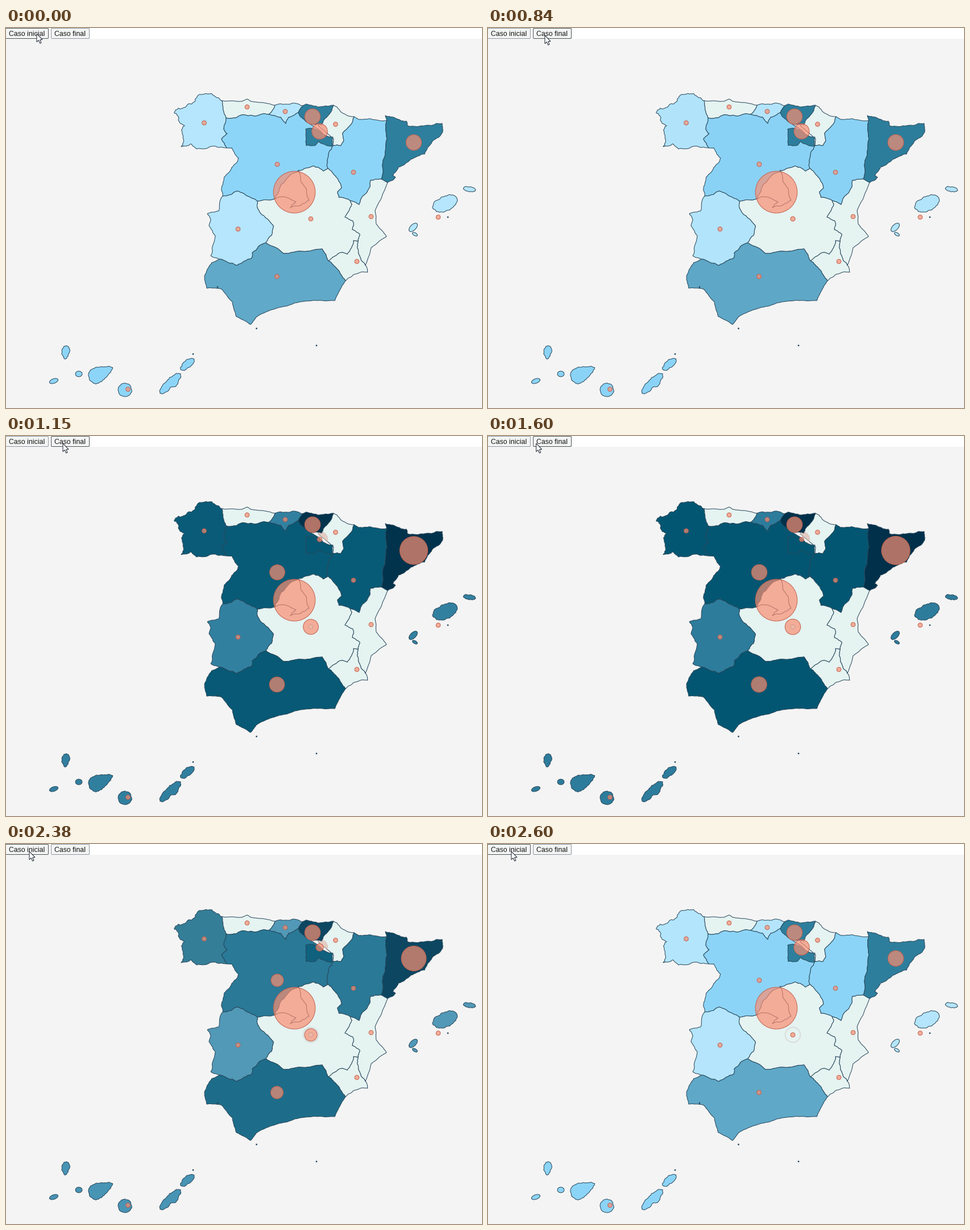
Write a matplotlib script that moves like this. It is 837 by 669 pixels and loops after 2.67 s.

```python
import numpy as np
import matplotlib.pyplot as plt
from matplotlib.animation import FuncAnimation
from matplotlib.colors import to_rgb
from matplotlib.patches import Circle, FancyBboxPatch, Polygon, Rectangle

W, H, DPI = 837, 669, 64
PX = 72 / DPI
LOOP, INTERVAL = 2670, 30
TICK = LOOP / 35

rng = np.random.default_rng(7)
plt.rcParams["toolbar"] = "None"
fig = plt.figure(figsize=(W / DPI, H / DPI), dpi=DPI, facecolor="white")
ax = fig.add_axes([0, 0, 1, 1])
ax.set_xlim(0, W)
ax.set_ylim(H, 0)
ax.axis("off")
ax.add_patch(Rectangle((0, 19), W, H, fc="#f4f4f4", ec="none", zorder=0))


def edge(*xy, wild=0.1):
    """Line through a few key points, roughened by midpoint displacement."""
    p = np.reshape(xy, (-1, 2)).astype(float)
    while np.hypot(*np.diff(p, axis=0).T).max() > 5:
        d = np.diff(p, axis=0)
        normal = np.column_stack([-d[:, 1], d[:, 0]])
        mid = p[:-1] + d / 2 + normal * rng.uniform(-wild, wild, (len(d), 1))
        p = np.insert(p, np.arange(1, len(p)), mid, axis=0)
    return p


def isle(x, y, a, b, turn=0, taper=0):
    """Rough ellipse; a negative taper narrows the end it points to."""
    th = np.linspace(0, 2 * np.pi, 13)
    u = a * np.cos(th)
    v = b * np.sin(th) * (1 + taper * np.cos(th))
    c, s = np.cos(np.radians(turn)), np.sin(np.radians(turn))
    pts = np.column_stack([x + u * c - v * s, y + u * s + v * c])
    return edge(*pts.ravel(), wild=0.2)


def join(*edges):
    return np.concatenate(edges)


# Borders are shared, so neighbours always fit together
gal_coast = edge(380, 128, 366, 119, 354, 116, 335, 123, 326, 134, 303, 141, 296, 150,
                 303, 162, 314, 172, 309, 181, 312, 195, 308, 209, wild=0.22)
gal_south = edge(308, 209, 325, 204, 335, 213, 388, 211)
gal_east = edge(380, 128, 387, 158)
gal_cyl = edge(387, 158, 383, 178, 389, 186, 379, 195, 388, 211)
ast_coast = edge(380, 128, 416, 129, 424, 125, 430, 129, 473, 136, wild=0.05)
ast_cyl = edge(387, 158, 405, 158, 414, 153, 462, 152)
ast_can = edge(473, 136, 462, 152)
can_coast = edge(473, 136, 492, 134, 506, 132, 522, 137)
can_cyl = edge(462, 152, 483, 157, 492, 168, 497, 157, 514, 149)
can_bas = edge(522, 137, 514, 149)
bas_coast = edge(522, 137, 527, 134, 548, 139, 576, 136)
bas_south = edge(576, 136, 563, 158, 555, 171, 528, 165, 514, 149)
rioja = edge(527, 178, 541, 177, 556, 186, 575, 192, 573, 208, 550, 200, 545, 206,
             528, 207, 527, 178)
nav_coast = edge(576, 136, 582, 139, 592, 150, 612, 156)
nav_ara = edge(612, 156, 592, 185, 594, 198, 589, 207, 575, 207)
ara_north = edge(612, 156, 620, 161, 670, 162)
ara_cat = edge(670, 162, 670, 195, 663, 233, 660, 266)
ara_val = edge(660, 266, 641, 268, 640, 280, 627, 296, 621, 311, 605, 304)
ara_clm = edge(566, 247, 580, 262, 590, 281, 583, 288, 585, 298, 605, 304)
ara_cyl = edge(575, 207, 565, 233, 566, 247)
cat_coast = edge(670, 162, 667, 154, 704, 164, 706, 172, 730, 172, 767, 168, 768, 183,
                 736, 222, 690, 245, 680, 260, 685, 263, 671, 272)
cat_val = edge(671, 272, 660, 266)
val_coast = edge(671, 272, 649, 322, 651, 345, 669, 367, 642, 387, 632, 418, wild=0.04)
val_clm = edge(605, 304, 608, 310, 596, 333, 610, 340, 609, 355, 622, 363, 619, 375)
val_mur = edge(619, 375, 620, 398, 632, 418)
mur_clm = edge(619, 375, 611, 374, 600, 398, 590, 395, 567, 410)
mur_and = edge(567, 410, 582, 424, 597, 445)
mur_coast = edge(632, 418, 636, 430, 615, 433, 597, 445)
cyl_clm = edge(566, 247, 558, 252, 540, 243, 514, 251)
mad_west = edge(514, 251, 483, 277, 473, 301)
mad_east = edge(473, 301, 484, 297, 510, 306, 500, 316, 533, 303, 528, 283, 514, 251)
clm_west = edge(473, 301, 442, 305)
cyl_ext = edge(442, 305, 407, 287, 381, 296)
cyl_west = edge(381, 296, 384, 262, 409, 229, 397, 211, 388, 211)
ext_west = edge(381, 296, 374, 322, 354, 327, 360, 337, 357, 348, 368, 366, 360, 401, 375, 407)
ext_and = edge(375, 407, 406, 418, 432, 405, 433, 396, 457, 378)
ext_clm = edge(442, 305, 444, 320, 470, 348, 467, 365, 457, 378)
and_clm = edge(457, 378, 488, 397, 556, 389, 567, 410, wild=0.06)
and_coast = edge(597, 445, 578, 480, 508, 484, 455, 501, 440, 509, 430, 522, 405, 508,
                 398, 482, 378, 459, 353, 458, 349, 437, 362, 413, 375, 407, wild=0.06)
# Inner sides, hidden below the two small northern regions
cyl_inner = edge(514, 149, 528, 165, 552, 180, 575, 207, wild=0)
nav_inner = edge(575, 207, 576, 195, 549, 172, 576, 136, wild=0)

PALE = ("#e5f3f1", "#e5f3f1")
LIGHT = ("#b5e6fd", "#2d7c9c")
SKY = ("#8dd5f8", "#035672")
DARK = ("#2d7f9d", "#00304a")

navarra = join(nav_coast, nav_ara, nav_inner)
regions = [
    (join(gal_coast, gal_south, gal_cyl[::-1], gal_east[::-1]), (LIGHT[0], SKY[1])),
    (join(ast_coast, ast_can, ast_cyl[::-1], gal_east[::-1]), PALE),
    (join(ast_cyl, can_cyl, cyl_inner, ara_cyl, cyl_clm, mad_west, clm_west, cyl_ext,
          cyl_west, gal_cyl[::-1]), SKY),
    (join(can_coast, can_bas, can_cyl[::-1], ast_can[::-1]), LIGHT),
    (navarra, PALE),
    (join(ara_north, ara_cat, ara_val, ara_clm[::-1], ara_cyl[::-1], nav_ara[::-1]), SKY),
    (join(cat_coast, cat_val, ara_cat[::-1]), DARK),
    (join(val_coast, val_mur[::-1], val_clm[::-1], ara_val[::-1], cat_val[::-1]), PALE),
    (join(mur_coast, mur_and[::-1], mur_clm[::-1], val_mur), PALE),
    (join(cyl_clm[::-1], ara_clm, val_clm, mur_clm, and_clm[::-1], ext_clm[::-1],
          clm_west[::-1], mad_east), PALE),
    (join(mad_west, mad_east), PALE),
    (join(ext_west, ext_and, ext_clm[::-1], cyl_ext), LIGHT),
    (join(and_clm, mur_and, and_coast, ext_and), ("#60a9c9", SKY[1])),
]
top_regions = [
    (join(bas_coast, bas_south, can_bas[::-1]), DARK),
    (rioja, (DARK[0], SKY[1])),
]
east_isles = [isle(772, 309, 23, 13, -25), isle(815, 284, 11, 4.5, 10),
              isle(716, 351, 9.5, 5, -45), isle(719, 363, 5, 2.5, 30)]
west_isles = [isle(105, 571, 12, 6.5, 95, -0.3), isle(84, 621.5, 8, 4, -20),
              isle(128, 609, 6, 5), isle(167, 608, 23, 12, -27, -0.6),
              isle(209, 637, 12, 12), isle(289, 626, 25, 8, -43),
              isle(319, 592, 15, 6.5, -38)]
regions += [(s, LIGHT) for s in east_isles]
regions += [(s, (SKY[0], LIGHT[1])) for s in west_isles]

LINE = "#27475b"
areas = []


def add_area(shape, pair, z):
    patch = ax.add_patch(Polygon(shape, ec=LINE, lw=PX, joinstyle="round", zorder=z))
    areas.append((patch, *(np.array(to_rgb(c)) for c in pair)))
    return patch


for shape, pair in regions:
    patch = add_area(shape, pair, 1)
    if shape is navarra:
        navarra_patch = patch
for shape, pair in top_regions:
    add_area(shape, pair, 3)

for x, y in [(777, 333), (329, 574), (440.5, 529), (546, 559), (372, 456)]:
    ax.add_patch(Circle((x, y), 1.4, fc=LINE, ec="none", zorder=4))

SMALL, LARGE = 3.8, 13.7
CENTRE, CORNER = (536, 336), (551.5, 182)

# Traces that the resizing bubbles leave on pale ground
smear = ax.add_patch(Circle(CORNER, 14, fc="#e4cbc1", ec="#d9c4bb", lw=PX, zorder=2))
smear.set_clip_path(navarra_patch)
halo = ax.add_patch(Circle(CENTRE, 13.2, fc="none", ec="#dadedc", lw=2 * PX, zorder=4))
dot = ax.add_patch(Circle(CENTRE, 4, fc="#edb7a5", ec="#d59a89", lw=PX, zorder=7))

bubbles = []


def add_bubble(spot, r0, r1):
    c = Circle(spot, r0, fc=to_rgb("#fa8f73") + (0.7,), ec="#c2624d", lw=PX, zorder=6)
    bubbles.append((ax.add_patch(c), r0, r1))


for spot in [(348.5, 167), (424, 139), (491, 147), (579.5, 169.5), (611, 254), (408, 354),
             (642, 332), (617, 411), (760, 333), (214.5, 636)]:
    add_bubble(spot, SMALL, SMALL)
for spot in [(477, 240), CENTRE, (476.5, 437.5)]:
    add_bubble(spot, SMALL, LARGE)
add_bubble(CORNER, LARGE, SMALL)
add_bubble((539, 156), LARGE, LARGE)
add_bubble((717, 201.5), LARGE, 25)
add_bubble((507, 289), 36.8, 36.8)


def button(x0, x1, label):
    box = FancyBboxPatch((x0 + 0.5, 0.5), x1 - x0 - 1, 18, boxstyle="round,pad=0,rounding_size=1.5",
                         fc="#f3f4f4", lw=PX, zorder=8)
    ax.add_patch(box)
    ax.text(x0 + 6, 14, label, family="Liberation Sans", size=12.3 * PX, color="#111111",
            va="baseline", zorder=10)
    return box


first = button(-1, 75, "Caso inicial")
second = button(79, 147, "Caso final")
glow = ax.add_patch(Circle((0, 0), 11, fc="#ffee22", ec="none", alpha=0.6, zorder=9))

ARROW = np.array([(0, 0), (0, 14.5), (3.3, 11.6), (5.7, 17), (8, 16), (5.7, 10.8), (10, 10.5)])
cursor = ax.add_patch(Polygon(ARROW, fc="white", ec="#1c2433", lw=PX, zorder=12))


def smooth(u):
    u = min(max(u, 0), 1)
    return u * u * (3 - 2 * u)


def cubic(u):
    u = min(max(u, 0), 1)
    return 4 * u ** 3 if u < 0.5 else 1 - 4 * (1 - u) ** 3


def pointer(k):
    if k < 20:
        s = smooth(k / 7)
        return 54 + 46 * s, 10 + 3 * s
    return 100 - 59 * smooth((k - 19) / 6), 13


def set_border(box, over, pressed):
    box.set_edgecolor("#a3abb0" if over and pressed else "#4b5358" if over else "#8d979c")


def update(i):
    # The picture advances in whole ticks
    k = int((i * INTERVAL + 20) / TICK)
    t = k * TICK
    back = cubic((t - 2160) / 500)
    f = cubic((t - 750) / 500) - back

    for patch, a, b in areas:
        patch.set_facecolor(np.clip(a + (b - a) * f, 0, 1))
    for c, r0, r1 in bubbles:
        c.set_radius(r0 + (r1 - r0) * f)
    smear.set_visible(f > 0.05)
    dot.set_visible(f > 0.1)
    halo.set_visible(back > 0.02)

    x, y = pointer(k)
    cursor.set_xy(ARROW + (x, y))
    click = k in (8, 9, 27, 28)
    glow.set_visible(click)
    glow.center = (x - 0.5, y)
    set_border(first, x < 75, click)
    set_border(second, x > 79, click)
    return []


anim = FuncAnimation(fig, update, frames=LOOP // INTERVAL, interval=INTERVAL,
                     init_func=lambda: update(0), repeat=True, repeat_delay=0,
                     cache_frame_data=False)
plt.show()
```
